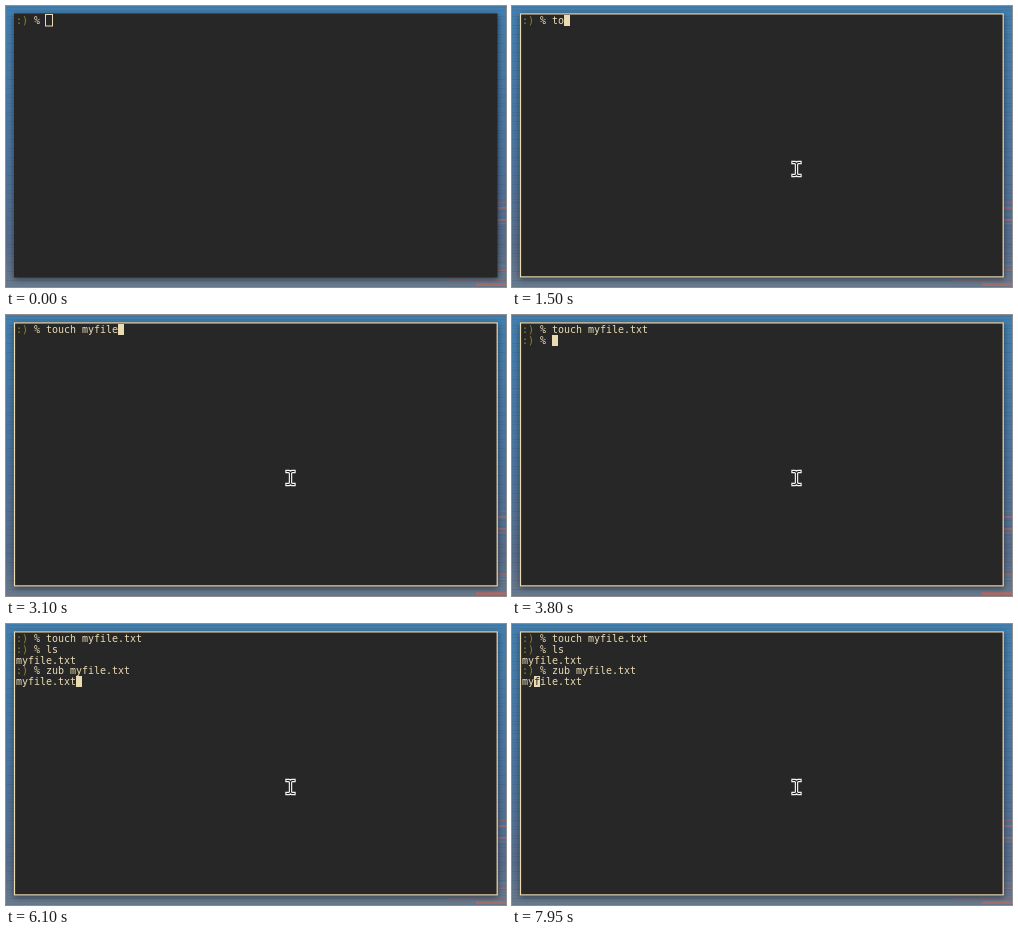
These frames come from a looping animation (500 px wide and 281 px high, 8 s). An HTML page with a canvas:

```html
<!DOCTYPE html>
<html lang="en">
<head>
<meta charset="utf-8">
<title>Terminal session</title>
<style>
html, body { margin: 0; width: 100%; height: 100%; overflow: hidden; background: #4a759c; }
canvas { display: block; }
</style>
</head>
<body>
<canvas id="stage" width="500" height="281"></canvas>
<script>
const ctx = document.getElementById('stage').getContext('2d');
const LOOP = 8000, CELL = 6, LINE = 10.8, LEFT = 10, TOP = 9;
const CREAM = '#ebdbb2', DARK = '#282728', OLIVE = '#8f8422';
const FILE = 'myfile.txt';

// Each command: key press times and the moment Enter is pressed.
// A last key beyond the typed letters completes the rest of the text.
const commands = [
  { text: 'touch ' + FILE, enter: 3800, row: 0, start: 0,
    keys: [1250, 1500, 1750, 1850, 1950, 2100, 2550, 2650, 2800, 2850, 3050, 3100, 3150, 3250, 3500, 3750] },
  { text: 'ls', enter: 4400, row: 1, start: 3800, keys: [4200, 4250] },
  { text: 'zub ' + FILE + ' ', enter: 6100, row: 3, start: 4400,
    keys: [4950, 5050, 5200, 5250, 5350, 5400, 5500, 5550, 5600, 5700, 5750, 5850] }
];
const leftKeys = [6700, 6850, 6950, 7050, 7200, 7350, 7500, 7900];

// Pointer path: time, x, y
const path = [[250, 499, 283], [600, 495, 268], [1150, 495, 268], [1500, 284, 163]];

const pressed = (times, t) => times.filter(k => t >= k).length;
const rowTop = row => Math.round(TOP + row * LINE);

function rect(color, x, y, w, h) {
  ctx.fillStyle = color;
  ctx.fillRect(x, y, w, h);
}

function write(text, col, row, color = CREAM) {
  ctx.font = '10px "DejaVu Sans Mono", monospace';
  ctx.fillStyle = color;
  [...text].forEach((ch, i) => ctx.fillText(ch, LEFT + (col + i) * CELL, rowTop(row) + 9));
}

function drawCursor(col, row, focused, under = '') {
  const x = LEFT + col * CELL, y = rowTop(row);
  if (focused) {
    rect(CREAM, x, y, CELL, 11);
    write(under, col, row, DARK);
  } else {
    ctx.strokeStyle = CREAM;
    ctx.lineWidth = 1;
    ctx.strokeRect(x - 0.5, y - 0.5, CELL + 1, 11.5);
  }
}

function drawDesktop() {
  const sky = ctx.createLinearGradient(0, 0, 0, 281);
  sky.addColorStop(0, '#437fae');
  sky.addColorStop(0.5, '#4b749e');
  sky.addColorStop(0.85, '#586d8b');
  sky.addColorStop(1, '#687a8d');
  rect(sky, 0, 0, 500, 281);
  for (let y = 1; y < 281; y += 3) {
    rect(`rgba(30,50,80,${0.06 + 0.06 * Math.sin(y * 7)})`, 0, y, 500, 1);
  }
  const glow = 'rgba(190,105,95,';
  [[490, 196, 10, 1, .5], [492, 201, 8, 2, .6], [490, 213, 10, 2, .6], [492, 217, 8, 1, .4],
   [491, 259, 9, 1, .5], [492, 264, 8, 1, .5], [440, 274, 60, 1, .25], [470, 277, 30, 3, .7]]
    .forEach(([x, y, w, h, a]) => rect(glow + a + ')', x, y, w, h));
}

function drawWindow(focused) {
  ctx.save();
  ctx.shadowColor = 'rgba(0,0,0,.5)';
  ctx.shadowBlur = 6;
  ctx.shadowOffsetY = 1;
  rect(DARK, 8, 7.5, 483.5, 264);
  ctx.restore();
  if (focused) {
    ctx.strokeStyle = CREAM;
    ctx.lineWidth = 1.2;
    ctx.strokeRect(8.5, 7.9, 482.7, 263);
  }
}

function drawTerminal(t, focused) {
  for (const { text, enter, row, start, keys } of commands) {
    if (t < start) break;
    const count = pressed(keys, t);
    const shown = count === keys.length ? text : text.slice(0, count);
    write(':)', 0, row, OLIVE);
    write('%', 3, row);
    write(shown, 5, row);
    if (t < enter) drawCursor(5 + shown.length, row, focused);
  }
  if (t >= 4400) write(FILE, 0, 2);
  if (t >= 6100) {
    const col = FILE.length - pressed(leftKeys, t);
    write(FILE, 0, 4);
    drawCursor(col, 4, true, FILE[col]);
  }
}

function pointerAt(t) {
  const next = path.findIndex(p => p[0] > t);
  if (next < 0) return path[path.length - 1].slice(1);
  const [t0, x0, y0] = path[next - 1], [t1, x1, y1] = path[next];
  const u = (t - t0) / (t1 - t0), e = u * u * (3 - 2 * u);
  return [x0 + (x1 - x0) * e, y0 + (y1 - y0) * e];
}

function drawPointer(t) {
  if (t < path[0][0]) return;
  const [x, y] = pointerAt(t);
  ctx.save();
  ctx.translate(x, y);
  if (x > 491) {
    const arrow = new Path2D('M0 0V13L3 10.3L5 15L7.2 14L5.2 9.5H9.5Z');
    ctx.strokeStyle = '#ddd';
    ctx.lineWidth = 1.2;
    ctx.stroke(arrow);
    ctx.fillStyle = '#000';
    ctx.fill(arrow);
  } else {
    const beam = new Path2D('M-3 -6.5H-1L.5 -5.5L2 -6.5H4M.5 -5.5V5.5M-3 6.5H-1L.5 5.5L2 6.5H4');
    ctx.lineCap = 'square';
    [['#f4f4f4', 3.4], ['#1c1c1c', 1.1]].forEach(([color, width]) => {
      ctx.strokeStyle = color;
      ctx.lineWidth = width;
      ctx.stroke(beam);
    });
  }
  ctx.restore();
}

function frame(now) {
  const t = now % LOOP, focused = t >= 650;
  drawDesktop();
  drawWindow(focused);
  drawTerminal(t, focused);
  drawPointer(t);
  requestAnimationFrame(frame);
}
requestAnimationFrame(frame);
</script>
</body>
</html>
```
